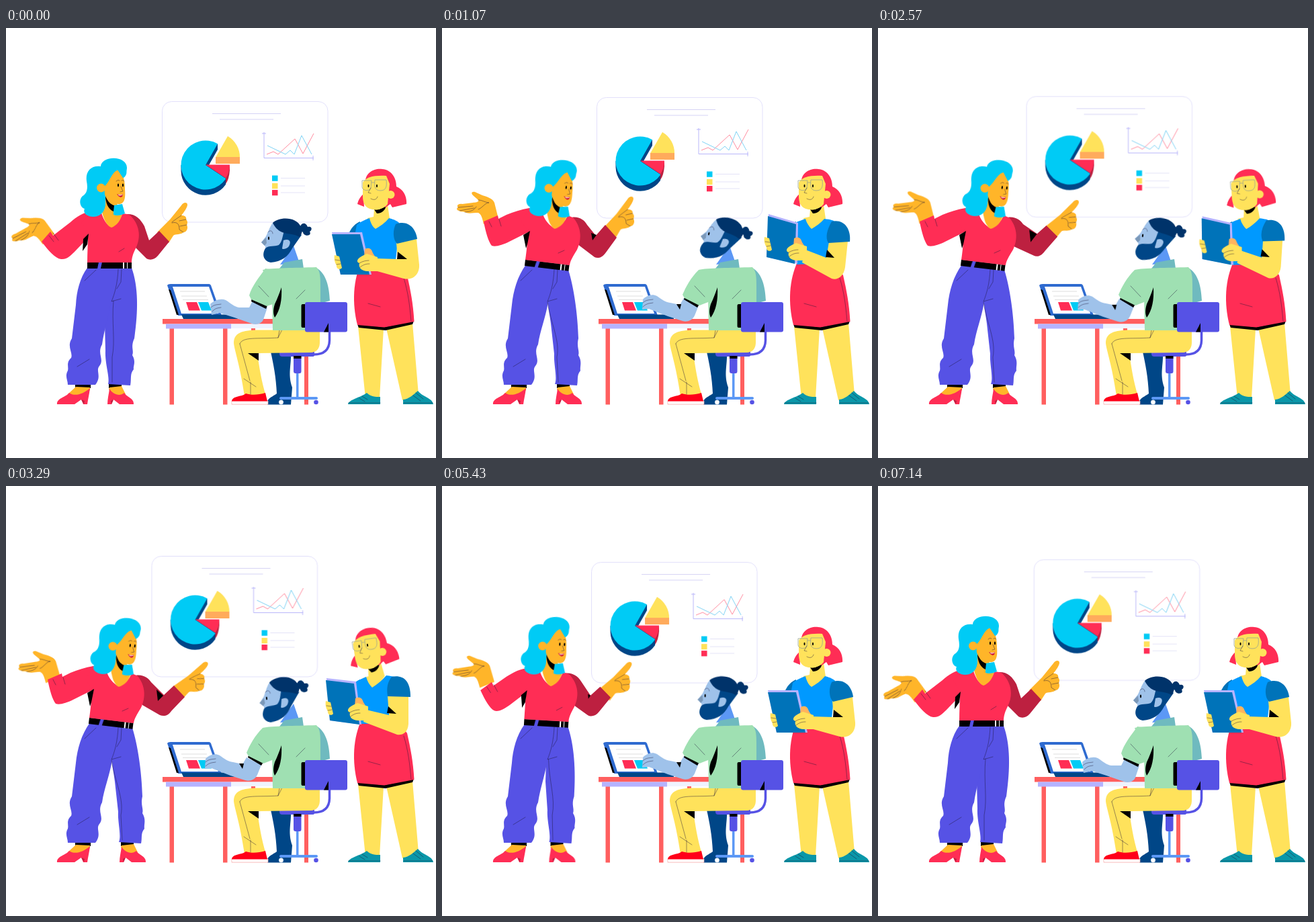
Recreate the animation shown at these times as an HTML page without scripts. Size 640 px wide and 640 px high, loop 7.21 s.

```html
<!DOCTYPE html>
<html lang="en">
<head>
<meta charset="utf-8">
<title>Team presentation</title>
<style>
html,body{margin:0;width:100%;height:100%;overflow:hidden;background:#fff}
svg{display:block;width:100vw;height:100vh}
.red{fill:#ff2d55}.wine{fill:#bd2040}.cyan{fill:#00cbf5}.navy{fill:#004687}
.violet{fill:#5652e5}.lilac{fill:#b5b3ff}.amber{fill:#ffb529}.yellow{fill:#ffe25b}
.coral{fill:#ff5f5f}.sky{fill:#0099ff}.ocean{fill:#0073b9}.teal{fill:#0a97a9}
.mint{fill:#9fe0b2}.sage{fill:#6fbabf}.pale{fill:#9fc2ea}.blue{fill:#5c98f5}.white{fill:#fff}
.line{fill:none;stroke:#1d1638;stroke-width:.7;stroke-opacity:.65;stroke-linecap:round;stroke-linejoin:round}
.chart path{fill:none;stroke-width:1}

/* every motion shares one loop */
.board,.shift,.point,.read,.type,.w-head,.w-hand,.w-point,.hip,.foot,.m-head,.bob,.r-head,.r-hand,.r-fingers{
  animation:7.21s ease-in-out infinite}

/* path morphs between the poses given in --a … --d */
.shift{d:var(--a);animation-name:shift}
@keyframes shift{0%,84%,100%{d:var(--a)}15%,66%{d:var(--b)}}
.point{d:var(--a);animation-name:point}
@keyframes point{0%,84%,100%{d:var(--a)}15%{d:var(--b)}27.7%,62%{d:var(--c)}45.6%{d:var(--d)}59.5%{d:var(--c)}}
.read{d:var(--a);animation-name:read}
@keyframes read{0%,64%,100%{d:var(--a)}13%,31%{d:var(--b)}42%,53%{d:var(--c)}}
.type{d:var(--a);animation-name:type}
@keyframes type{0%,97%,100%{d:var(--a)}13%,88%{d:var(--b)}}

.board{animation-name:board;animation-timing-function:linear}
@keyframes board{
  0%,100%{transform:none}
  7%{transform:translate(-.5px,-3.3px)}
  14.8%{transform:translate(-2px,-6px)}
  21%{transform:translate(-4.3px,-7.7px)}
  27.7%{transform:translate(-7.3px,-8.3px)}
  37%{transform:translate(-12.2px,-7.4px)}
  45.6%{transform:translate(-15.5px,-5px)}
  52%{transform:translate(-16.2px,-2.4px)}
  59.5%{transform:translate(-15.5px,.6px)}
  68%{transform:translate(-13px,3px)}
  75.3%{transform:translate(-10px,4.1px)}
  82%{transform:translate(-6.5px,4.5px)}
  88%{transform:translate(-3.4px,3.6px)}
}
.w-head{transform-origin:157px 277px;animation-name:w-head}
@keyframes w-head{0%,84%,100%{transform:none}15%,66%{transform:translate(13px,2px) rotate(6.5deg)}}
.w-hand{transform-origin:72px 284px;animation-name:w-hand}
@keyframes w-hand{
  0%,84%,100%{transform:translate(-11px,27px) rotate(-22deg)}
  14.8%{transform:none}
  27.7%,59.5%,65%{transform:translate(1.5px,-1.5px) rotate(1.5deg)}
  45.6%{transform:translate(-3px,1px) rotate(-2deg)}
  75.3%{transform:translate(-6px,8px) rotate(-2deg)}
}
.w-point{transform-origin:235px 310px;animation-name:w-point}
@keyframes w-point{
  0%,84%,100%{transform:none}
  14.8%{transform:translate(16.5px,-8px) rotate(-2deg)}
  27.7%{transform:translate(24.5px,-10px) rotate(4deg)}
  45.6%{transform:translate(23px,-4.5px) rotate(10deg)}
  59.5%,62%{transform:translate(24.5px,-10px) rotate(-2deg)}
  75.3%{transform:translate(8.5px,-1px) rotate(5deg)}
}
.hip{transform-origin:121px 349px;animation-name:hip}
@keyframes hip{0%,84%,100%{transform:none}15%,66%{transform:translate(3px,-4px) rotate(6.9deg)}}
.foot{animation-name:foot}
@keyframes foot{0%,84%,100%{transform:none}15%,66%{transform:translate(18px,0)}}
.m-head{transform-origin:425px 338px;animation-name:m-head}
@keyframes m-head{
  0%,100%{transform:none}
  13%,31%{transform:rotate(12.5deg)}
  43%,62%{transform:translate(-1px,0) rotate(-5deg)}
  76%{transform:rotate(1.5deg)}
}
.bob{animation-name:bob}
@keyframes bob{0%,15%,28%,76%,100%{transform:none}45%,60%{transform:translate(-2px,2px)}}
.r-head{transform-origin:555px 285px;animation-name:r-head}
@keyframes r-head{
  0%,31%,66%,100%{transform:none}
  42%,53%{transform:translate(-7px,1px) rotate(-8deg)}
  59.5%{transform:translate(-3px,.3px) rotate(-3.5deg)}
}
.r-hand{animation-name:r-hand}
@keyframes r-hand{0%,64%,100%{transform:none}13%,31%{transform:translate(-10px,-16px)}42%,53%{transform:translate(-14px,-13px)}}
.r-fingers{animation-name:r-fingers}
@keyframes r-fingers{0%,64%,100%{transform:none}13%,31%{transform:translate(-9px,-27px)}42%,53%{transform:translate(-13px,-18px)}}
</style>
</head>
<body>
<svg viewBox="0 0 640 640">

<!-- presentation board -->
<g class="board">
  <rect x="232.5" y="109.5" width="246.5" height="179.5" rx="14" fill="#fff" stroke="#dfddfb" stroke-width=".9"/>
  <g class="chart">
    <path stroke="#d5d3f5" d="M307 127.5H409M318 136H398"/>
    <path stroke="#b9b6fa" d="M384 155V193.5H458M381 157H387M457 190V197"/>
    <path stroke="#ff8c9f" d="M388 188L398 184L405 188L430 165L442 187L458 157"/>
    <path stroke="#7fd3f5" d="M389 175L416 188L423 182L429 188L440 160L455 188"/>
    <path stroke="#e4e3f8" d="M409 223.5H445M409 235H445M409 245H445"/>
  </g>
  <path class="navy" d="M260.5 204V213A36.5 36.5 0 0 0 327 233V223L302 204L315 181V172L297 190Z"/>
  <path class="cyan" d="M297 204L315 172.3A36.5 36.5 0 1 0 327.3 224.3Z"/>
  <path class="wine" d="M333 203.5V212Q332 225 327 232V222Z"/>
  <path class="red" d="M297 203.5H333Q333 215 327 223.5Z"/>
  <path class="yellow" d="M312 192.5L330 161A36 36 0 0 1 348 192.5Z"/>
  <rect x="312" y="192" width="36" height="10" fill="#ffab5c"/>
  <rect class="cyan" x="396" y="219.5" width="8.5" height="8.3"/>
  <rect class="yellow" x="396" y="231" width="8.5" height="8.3"/>
  <rect class="red" x="396" y="241" width="8.5" height="8.3"/>
</g>

<!-- woman with tablet -->
<g>
  <path class="yellow" d="M524 444L562 447L556 551H535ZM566 447L605 439L614 546L590 554Z"/>
  <path class="teal" d="M509 560C510 553 528 550 537 543C543 549 550 549 557 549V560ZM591 560V553C600 552 606 546 613 540C621 550 634 550 636 560Z"/>
  <path class="line" d="M510 558H557M592 558H635M526 551L534 556M530 548L538 553M610 543L621 552M606 547L617 555"/>
  <path d="M523 441L563 445L607 436L605 441L565 450L525 446Z"/>
  <path class="red" d="M530 346C516 375 515 410 523 442L563 445.5L607.5 437C606 410 602 390 597 368L580 344Z"/>
  <path class="line" d="M539 410L557 415M592 372C599 395 601 415 603 437"/>
  <g class="r-head">
    <path class="yellow" d="M549 260L567 256L571 284C564 292 556 299 549 300C543 297 539 289 538 283L547 281Z"/>
    <path d="M548 270C555 272 562 268 566 262C566 270 560 276 552 276Z"/>
    <path class="red" d="M535 232C533 216 548 208 560 210C573 211 581 222 581 236C592 240 597 252 596 262L575 267L572 262L565 267L535 250ZM532 247C526 252 524 258 523 262L533 266Z"/>
    <path class="yellow" d="M531 230C535 222 548 219 566 220L571 232L568 262C562 270 552 271 545 270C534 268 531 260 531 250Z"/>
    <circle class="yellow" cx="572.5" cy="248" r="6"/>
    <path fill="none" stroke="#98a38f" stroke-width=".8" d="M530 227H544L543 238C542 243 531 243 530 237ZM549 226H566C567 236 566 242 557 242C549 242 548 236 549 226ZM544 230H549"/>
    <ellipse cx="539.5" cy="235" rx="1" ry="2.3"/><ellipse cx="552" cy="235" rx="1" ry="2.3"/>
    <path class="line" d="M543 238L539 245L543 246M543 254C548 257 552 255 553 251"/>
  </g>
  <path class="ocean" d="M511 304C515 296 520 291 527 288L526 304Z"/>
  <path class="sky read" style="--a:path('M522 293C528 288 535 285 541 283C543 292 547 297 550 299C557 295 564 290 570 283C578 285 584 288 586 291L580 346L535 352L520 304Z');--b:path('M526 290C531 287 536 286 541 284C543 291 547 296 550 299C557 295 564 290 569 284C578 285 584 286 586 290L575 350L528 352L526 300Z');--c:path('M520 292C526 288 532 286 536 284C538 291 541 296 545 300C553 295 560 289 566 282C572 283 577 283 580 285L572 354L524 354L520 300Z')"/>
  <path class="yellow read" style="--a:path('M581 320L611 314L615 352C616 368 604 376 592 373L549 361L550 343L583 344Z');--b:path('M576 318L604 317L600 356C598 370 588 376 580 373L536 349L541 330L572 342Z');--c:path('M568 313L599 312L599 354C598 368 590 371 582 370L532 351L536 333L570 341Z')"/>
  <path class="read" style="--a:path('M583 333L597 344L582 344Z');--b:path('M573 330L584 342L571 341Z');--c:path('M569 328L581 339L567 338Z')"/>
  <path class="ocean read" style="--a:path('M580 292C598 285 610 298 612 314L582 321C575 314 576 300 580 292Z');--b:path('M580 288C597 284 609 297 607 318L575 320C570 312 573 300 580 288Z');--c:path('M574 284C590 281 602 288 602 314L568 313C566 300 568 292 574 284Z')"/>
  <path class="lilac read" style="--a:path('M485 304L530 304L544 367L498 367Z');--b:path('M486 277L530 290L529 351L483 341Z');--c:path('M477 286L521 291L529 355L482 349Z')"/>
  <path class="ocean read" style="--a:path('M485 307L527 307L541 367L498 367Z');--b:path('M485 280L527 292L525 351L483 341Z');--c:path('M476 289L518 294L526 355L482 349Z')"/>
  <g class="r-hand">
    <path fill="#ffb45e" d="M533 341L534 329C540 326 544 328 546 335L551 343Z"/>
    <path class="yellow" d="M553 341L537 336C531 339 526 341 524 344C522 347 523 349 526 350C524 357 530 362 538 362H553Z"/>
    <path class="line" d="M526 350C531 347 536 346 540 346M527 356C532 352 536 351 541 351"/>
  </g>
  <g class="r-fingers">
    <path class="yellow" d="M489 338L496 340L500 357C497 361 491 358 492 353C489 349 488 343 489 338Z"/>
    <path class="line" d="M490 345L497 346M492 352L498 351"/>
  </g>
</g>

<!-- presenting woman -->
<g>
  <path d="M103 530H126V536H103Z"/>
  <path class="amber" d="M104 534L125 535V539C117 547 104 550 92 545Z"/>
  <path class="red" d="M76 560C75 551 90 549 94 543C102 549 115 545 125 536C124 545 122 552 121 560H115L112 553L102 560Z"/>
  <path class="wine" d="M112 553L117 555L116 560Z"/>
  <g class="foot">
    <path d="M153 530H172V536H153Z"/>
    <path class="amber" d="M154 535L172 533L178 545C168 550 158 546 153 538Z"/>
    <path class="red" d="M190 560C191 551 179 549 176 543C169 549 159 545 154 537C153 545 151 552 151 560H157L160 553L169 560Z"/>
    <path class="wine" d="M160 553L156 555L157 560Z"/>
  </g>
  <path class="violet shift" style="--a:path('M140 357L187 357C197 385 197 420 191 462C185 475 191 480 188 487C194 497 189 503 190 508C184 515 187 522 185 532L152 530C155 520 147 500 148 480L147 440C150 425 152 415 152 400Z');--b:path('M140 353L188 360C196 385 202 425 203 462C200 475 205 480 203 487C209 497 205 503 206 510C200 517 203 524 201 532L168 530C172 520 166 500 167 485L162 440C160 425 158 415 157 405Z')"/>
  <path class="violet shift" style="--a:path('M121 357C110 372 105 392 104 412L98 462C90 474 100 483 97 491C88 499 95 506 91 512C88 520 92 524 92 531L133 531C143 518 133 510 139 503C147 493 135 485 143 471C146 450 152 432 156 408L178 357Z');--b:path('M125 352C112 370 106 392 104 412L98 462C90 474 100 483 97 491C88 499 95 506 91 512C88 520 92 524 92 531L133 531C143 518 133 510 139 503C147 493 135 485 143 471C146 450 154 432 158 408L180 358Z')"/>
  <path class="line shift" style="--a:path('M167 359C166 380 162 395 157 407L171 403M160 406C157 440 163 465 158 490L158 527M172 359L171 378L165 388');--b:path('M167 359C166 380 162 395 157 407L171 403M157 408C162 440 176 465 171 490L173 527M172 360L171 378L165 388')"/>
  <path class="line" d="M106 504L124 493M117 376L134 360"/>
  <g class="hip">
    <path d="M121 348.5H187V358H121Z"/>
    <path class="violet" d="M138 348.5H143L141 358H136Z"/>
    <path class="white" d="M174 348.5H176V358H174ZM180 348.5H181V358H180Z"/>
  </g>
  <g class="w-point">
    <path class="amber" d="M225 304L244 285L261 264C264 259 270 259 270 263C270 267 265 274 261 279C267 279 269 282 268 285C271 288 270 291 269 293C272 298 268 305 264 304C261 308 252 306 249 309L242 320Z"/>
    <path class="line" d="M247 289C252 285 258 281 261 279M258 287L268 285M259 295L269 293M247 290C255 288 258 292 258 300L264 304"/>
  </g>
  <path class="wine point" style="--a:path('M178 277C193 276 200 284 206 295L213 316L228 302L243 318L226 339C221 345 214 346 209 343L193 327Z');--b:path('M193 282C204 280 212 286 216 293L229 309L243 293L260 312L244 334C238 343 231 343 227 341L202 322Z');--c:path('M193 282C204 280 212 286 216 292L238 303L251 292L268 308L250 330C244 338 238 340 233 337L203 325Z');--d:path('M193 282C204 280 212 286 216 292L235 311L250 297L266 314L246 335C241 343 234 343 229 341L203 326Z')"/>
  <path class="point" style="--a:path('M213 315L213 316L213 316Z');--b:path('M222 305L230 308L224 316Z');--c:path('M226 299L238 303L228 318Z');--d:path('M224 303L234 312L226 320Z')"/>
  <g class="w-hand">
    <path class="amber" d="M84 284L78 260C75 253 66 251 60 249L49 244C44 243 43 246 46 249L54 256C56 259 50 260 46 260L30 262C24 261 21 265 24 267C20 269 23 272 26 272C27 274 32 273 34 274C38 277 46 275 54 275C58 277 60 282 62 292Z"/>
    <path class="line" d="M24 267L46 265M26 272L48 268M34 274C44 273 48 271 51 266M54 256C60 256 62 259 70 260C64 260 60 268 54 270"/>
  </g>
  <path class="red shift" style="--a:path('M130 274C118 272 106 280 96 289L70 309L66 303L53 318C63 331 73 343 82 344C91 345 97 338 104 331L126 308Z');--b:path('M130 268C118 270 106 274 96 278L84 284L83 279L62 288C65 304 69 318 74 324C80 326 90 323 100 318L128 304Z')"/>
  <path class="red shift" style="--a:path('M128 274C133 275 138 276 142 275C145 285 150 294 157 296C165 293 170 285 173 277C178 276 181 277 185 279C198 292 202 310 193 328C189 336 187 342 187 349L121 349C121 335 122 320 122 305L112 290Z');--b:path('M130 268C138 269 144 271 149 274C152 285 160 295 168 298C176 295 184 287 187 279C190 280 193 281 196 283C208 298 208 315 201 330C195 340 191 346 190 353L124 345C126 332 127 320 128 303L118 288Z')"/>
  <path class="shift" style="--a:path('M123 306L115 314L114 332L121 322Z');--b:path('M131 302L121 308L125 328L127 322Z')"/>
  <path class="line shift" style="--a:path('M168 333L176 328M78 316L70 305M71 318L64 309');--b:path('M173 335L182 331M88 295L85 285M74 296L70 288')"/>
  <g class="w-head">
    <path class="amber" d="M147 245L143 274C146 287 151 295 157 297C165 294 171 286 173 276L163 258Z"/>
    <path class="cyan" d="M141 206C126 204 118 214 120 228C122 238 121 246 114 250C107 257 111 268 117 269C114 275 120 281 130 281C143 281 149 270 148 258V245L163 214C170 225 180 218 180 208C180 195 160 190 147 197C142 200 141 204 141 206ZM160 264L173 262L177 276C171 279 165 280 160 278Z"/>
    <path d="M148 249C150 257 156 263 161 264L160 273C153 270 148 262 148 249Z"/>
    <path class="amber" d="M146 236C154 231 157 213 168 211C174 216 177 226 177 240C178 252 177 262 168 262C158 262 150 256 147 248Z"/>
    <path class="cyan" d="M164 208H178C182 216 177 223 174 223Z"/>
    <circle class="amber" cx="141.5" cy="238" r="6.5"/>
    <ellipse cx="167" cy="234" rx="1.1" ry="2.4"/><ellipse cx="174" cy="234" rx="1.1" ry="2.4"/>
    <path class="line" d="M164 228Q167 225 169 227M172 227Q174 225 176 228M171 236L174 243L170 244"/>
    <path fill="#d01c38" d="M165 247Q170 249 174 247C174 254 168 253 165 247Z"/>
    <path class="white" d="M166.5 247.8Q170 249 173.5 247.4V248.6Q170 250 167.5 249Z"/>
  </g>
</g>

<!-- desk and laptop -->
<g>
  <path class="coral" d="M243.5 446H250V560.5H243.5ZM323 446H329.5V560.5H323ZM365 447H371V452H365ZM444 487H450V560.5H444ZM233 433H400V440.5H233Z"/>
  <path class="lilac" d="M238 440.5H335V447.5H238Z"/>
  <path fill="#eff3ff" d="M335 440.5H397V447H335Z"/>
  <path fill="#2f6bd0" d="M240 383Q241 381 245 381H302Q304 381 305 383L321 428H256Z"/>
  <path d="M242 389L245 390L257 427H254Z"/>
  <path class="white" d="M248 385H302L316 425H261Z"/>
  <path class="navy" d="M261 426.5H345V433H264Z"/>
  <path fill="none" stroke="#dedede" d="M259 392H296M261 399H299M263 404.5H301"/>
  <path class="red" d="M268 408H284L289 420.5H272Z"/>
  <path class="cyan" d="M286 408H301L306 420.5H291Z"/>
</g>

<!-- seated man -->
<g>
  <path class="navy" d="M394 482H424C425 502 419 515 426 535L424 560.5H389C387 551 397 549 403 544C402 520 398 500 394 482Z"/>
  <path class="violet" d="M407 482H459V487Q459 489 457 489H411Q407 489 407 485ZM428 488H439.5V511Q439.5 514 437 514H431Q428 514 428 511Z"/>
  <path d="M428 488H439.5V492H428Z"/>
  <path class="blue" d="M432 514H435.5V549H432Z"/>
  <rect class="blue" x="407" y="549" width="57" height="4" rx="2"/>
  <circle class="white" cx="409.5" cy="557" r="3.3" stroke="#cbd8ee" stroke-width=".6"/>
  <circle class="violet" cx="461.5" cy="557" r="3.3"/>
  <path class="yellow" d="M397 449.5C365 449.5 339 447 339 469C340 480 348 500 355 548H387C380 525 377 505 374 484L455 483C464 482 467 475 467 468V449Z"/>
  <path d="M360 484H376V495Z"/>
  <path class="line" d="M348 470C352 459 375 463 405 461L411 449M407 450L405 461M348 470L363 525M354 522L372 534M364 527V545"/>
  <path fill="#fff" stroke="#f7a5a5" stroke-width=".7" d="M336 555H390V560.2H336Z"/>
  <path fill="#ff0019" d="M336 555.5C337 547 352 549 357 544C366 547 376 546 386 543L389 555.5Z"/>
  <path class="blue" d="M408 352L428 324L437 350Z"/>
  <path class="sage" d="M462 357C477 366 481 385 482 406L467 410ZM407 358L414 349L441 344L443 358Z"/>
  <g class="m-head">
    <path class="pale" d="M397 290C392 297 390 304 387 310L380 319L386 325L386 332L412 335L416 300Z"/>
    <path fill="#7b98b8" d="M387 312L380 319L385 324L388 320Z"/>
    <path class="navy" d="M386 328C380 338 384 347 394 349C410 348 420 340 426 328L440 308L430 300L414 302C411 312 411 318 406 323C400 326 391 323 386 328Z"/>
    <path fill="#00336a" d="M397 290C406 281 432 280 439 296L441 302C440 306 439 308 437 311C429 306 419 307 411 304C404 301 400 296 397 290ZM437 299C438 291 445 287 449 296C456 294 456 301 452 303C456 310 443 311 442 304Z"/>
    <path class="pale" d="M413 316C422 313 425 318 421 325C418 329 411 330 411 328Z"/>
    <ellipse cx="391" cy="313" rx="1.1" ry="2.4"/>
    <path class="line" d="M390 304C393 300 397 302 397 306"/>
  </g>
  <path class="mint" d="M382 360C395 357 430 357 462 356C468 362 468 372 468 385V450H397L396 400Z"/>
  <g class="bob">
    <path class="pale type" style="--a:path('M306 427L304 411C310 405 320 402 327 405C335 410 340 415 347 416L362 416L368 404L389 416L383 434C380 441 372 442 366 440L340 431L318 424Z');--b:path('M298 419L299 404C304 399 312 395 320 399C327 404 332 408 340 409L354 412L360 402L382 413L376 428C372 436 364 438 358 436L336 429L308 418Z')"/>
    <path class="type" style="--a:path('M362 416L362 416L362 416Z');--b:path('M349 411L356 411L354 419Z')"/>
    <path class="line type" style="--a:path('M305 416C310 411 315 412 320 411M307 422C312 416 316 417 320 416');--b:path('M299 409C304 404 309 405 314 404M299 415C305 409 310 410 314 409')"/>
  </g>
  <path class="type" style="--a:path('M366 401L389 413L387 418L365 407Z');--b:path('M362 398L383 411L380 416L360 404Z')"/>
  <path class="mint type" style="--a:path('M386 358C376 372 366 384 362 398L365 404L388 414L400 410L412 386L412 362Z');--b:path('M382 360C370 372 363 385 358 397L361 402L383 413L396 408L412 386L412 362Z')"/>
  <path d="M410 386C411 405 408 420 400 431C397 424 398 418 400 411C404 403 407 394 410 386Z"/>
  <path class="line" d="M445 390L432 403M376 384L391 400"/>
  <path fill="none" stroke="#5652e5" stroke-width="3.5" d="M481.5 450V465Q481 486 458 486"/>
  <rect x="439.5" y="411" width="10" height="35" rx="2"/>
  <rect class="violet" x="445" y="408" width="63" height="44.5" rx="3"/>
  <path d="M473 452.5L480 439V452.5Z"/>
</g>
</svg>
</body>
</html>
```
